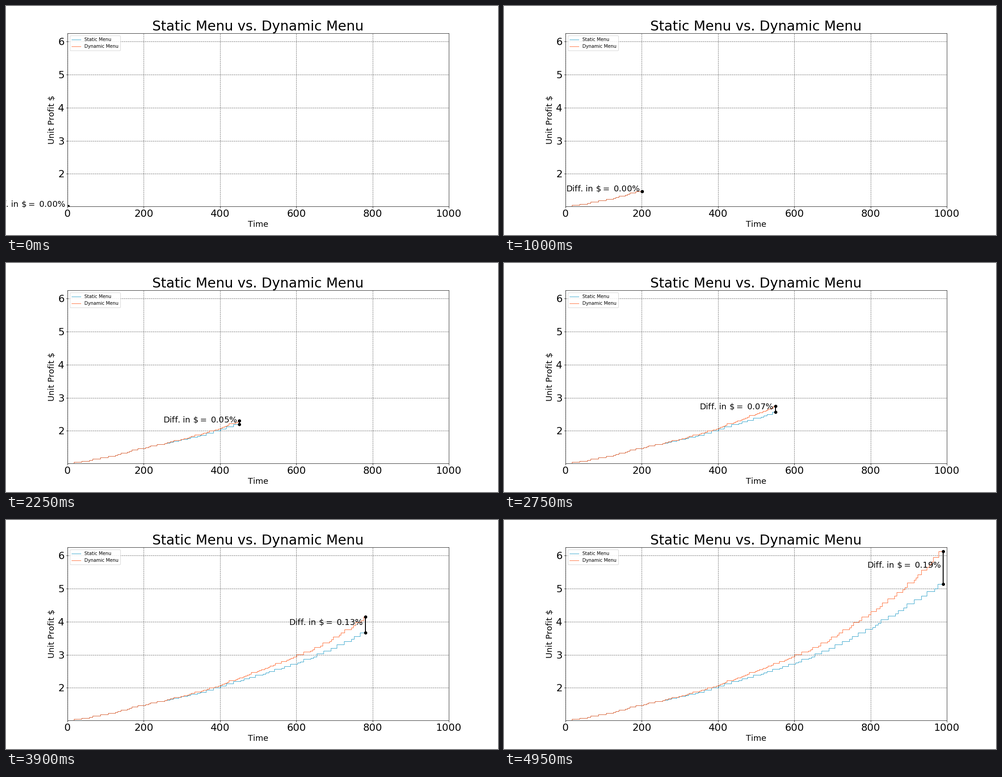
A matplotlib script that plays this animation: 1080x504 px, repeating every 5000 ms.

```python
import numpy as np
import matplotlib.pyplot as plt
from matplotlib.animation import FuncAnimation

plt.rcParams["font.family"] = "DejaVu Sans"
plt.rcParams["text.kerning_factor"] = 6

FRAMES, INTERVAL = 100, 50
STEP = 10                      # time units per frame
START, TOP = 1.017, 6.247
SPLIT = 272                    # the menus agree up to this time
BLUE, ORANGE = "#008cbe", "#ff4500"

# Key points (time, profit) of the growth curves.
SHARED_PINS = [(1, START), (201, 1.475), (250, 1.599)]
STATIC_PINS = [(361, 1.873), (451, 2.203), (651, 2.942),
               (781, 3.674), (991, 5.145)]
DYNAMIC_PINS = [(361, 1.937), (451, 2.313), (651, 3.223),
                (781, 4.155), (991, 6.132)]


def sale_times(rng, start, end, waits):
    """Random sale times after start, spaced by the given waits."""
    times = start + np.cumsum(rng.choice(waits, size=int(end - start)))
    return times[times < end]


def profit_curve(times, pins):
    """Each sale earns a share that grows with its wait, fitted to the pins."""
    waits = np.diff(np.append(times, 1001))
    gains = 0.0075 + 0.001 * np.minimum(waits, 20)
    logs = np.cumsum(gains)
    pin_t, pin_v = np.array(SHARED_PINS + pins).T
    at = np.searchsorted(times, pin_t, side="right") - 1
    logs += np.interp(np.arange(len(times)), at, np.log(pin_v) - logs[at])
    return times, np.exp(logs)


def visible(curve, now):
    times, values = curve
    n = np.searchsorted(times, now, side="right")
    return np.append(times[:n], now), np.append(values[:n], values[n - 1])


rng = np.random.default_rng(4)
shared = np.append(1, sale_times(rng, 1, SPLIT, [5, 6, 9, 16, 20]))
static_sales = sale_times(rng, shared[-1], 990, [7, 15, 19, 20, 15, 8, 19])
dynamic_sales = sale_times(rng, shared[-1], 990, [5, 6, 9, 15, 18])
static = profit_curve(np.append(shared, static_sales), STATIC_PINS)
dynamic = profit_curve(np.append(shared, dynamic_sales), DYNAMIC_PINS)

fig = plt.figure(figsize=(15, 7), dpi=72, facecolor="white")
ax = fig.add_axes([0.125, 0.125, 0.775, 0.755])
ax.set_xlim(0, 1000)
ax.set_ylim(START, TOP)
ax.set_yticks(range(2, 7))
ax.tick_params(labelsize=22)
ax.set_title("Static Menu vs. Dynamic Menu", fontsize=30)
ax.set_xlabel("Time", fontsize=18)
ax.set_ylabel(r"Unit Profit \$", fontsize=18)
ax.grid(color="black", linestyle="--", linewidth=0.8, alpha=0.65)

style = dict(drawstyle="steps-post", linewidth=1, alpha=0.8)
static_line, = ax.plot([], [], color=BLUE, label="Static Menu", **style)
dynamic_line, = ax.plot([], [], color=ORANGE, label="Dynamic Menu", **style)
gap_line, = ax.plot([], [], "ko-", linewidth=2, markersize=6)
label = ax.annotate("", (0, START), xytext=(-5, 0),
                    textcoords="offset points", ha="right", va="baseline",
                    fontsize=18, annotation_clip=False)
ax.legend(handles=[static_line, dynamic_line], loc="upper left", fontsize=10)


def update(frame):
    now = STEP * frame + 1
    static_path = visible(static, now)
    dynamic_path = visible(dynamic, now)
    low, high = static_path[1][-1], dynamic_path[1][-1]
    static_line.set_data(*static_path)
    dynamic_line.set_data(*dynamic_path)
    gap_line.set_data([now, now], [low, high])
    label.xy = (now, (low + high) / 2)
    label.set_text(rf"Diff. in \$$=$ {abs(high - low) / low:.2f}%")
    return static_line, dynamic_line, gap_line, label


anim = FuncAnimation(fig, update, frames=FRAMES, interval=INTERVAL,
                     init_func=lambda: update(0), repeat=True, repeat_delay=0)
plt.show()
```
